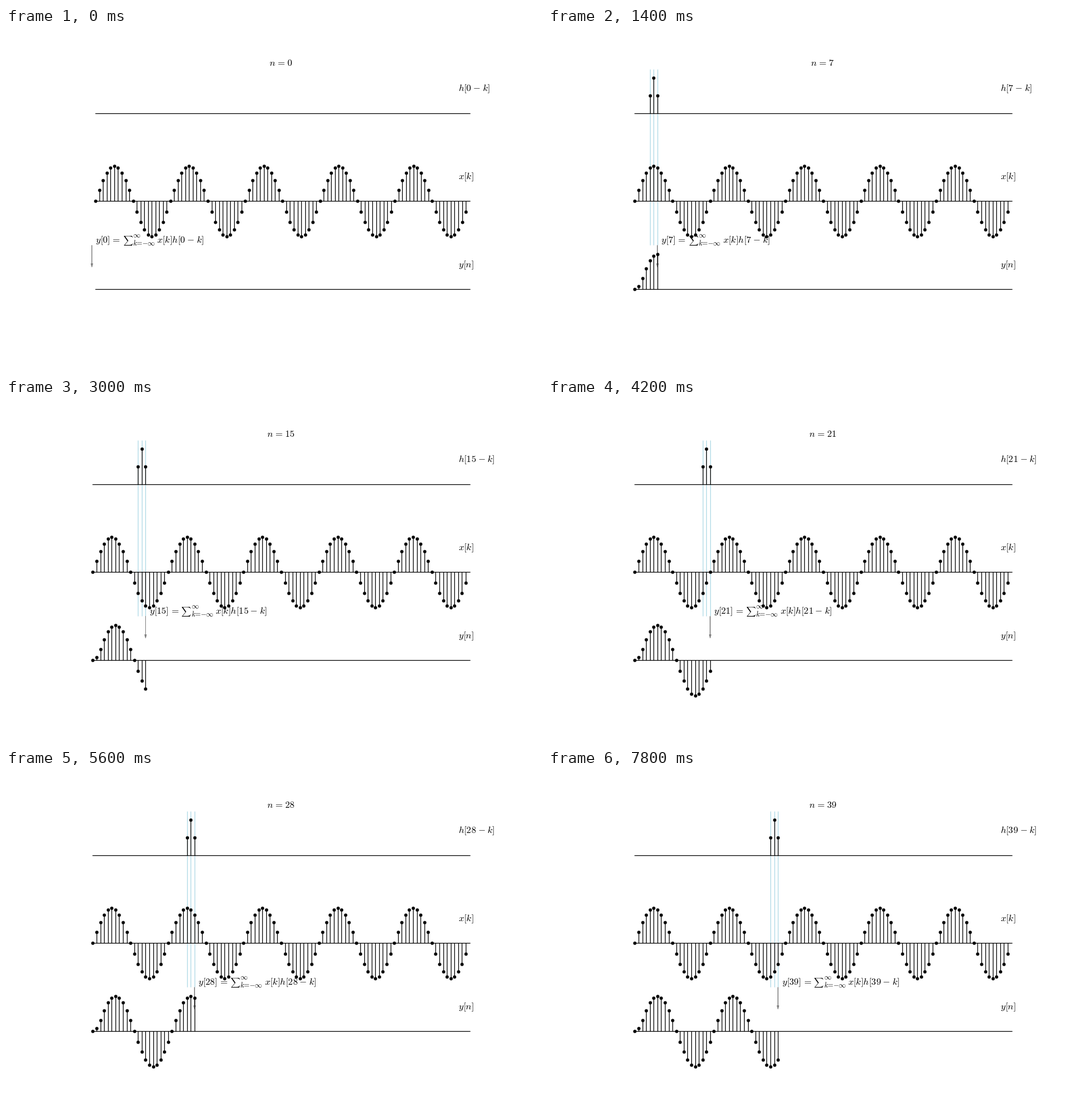
Animation of 935 by 599 pixels, one loop 8000 ms. Source, as a matplotlib script:

```python
import numpy as np
import matplotlib.pyplot as plt
from matplotlib.animation import FuncAnimation

plt.rcParams["mathtext.fontset"] = "cm"

W, H, DPI = 935, 599, 72        # at 72 dpi one point is one px
EM = 16.4                       # text size
LINE, EDGE, DOT = 1.25, 0.83, 5
LEFT, RIGHT = 0.125 * W, 0.9 * W
TOP, ROW = 0.12 * H, 0.77 * H / 3
BASES = [TOP + ROW * (i + 0.5) for i in range(3)]
UNIT = ROW / 2.5                # px per unit of amplitude
COUNT = 100
FRAMES, STEP = 40, 200

k = np.arange(COUNT)
x = np.sin(np.pi * k / 10)
h = np.array([0.5, 1, 0.5])
y = np.convolve(x, h)[:COUNT]
y /= np.abs(y).max()

# Operators with TeX-like spacing
EQ = r"\hspace{0.116}=\hspace{0.116}"
MINUS = r"\hspace{0.053}-\hspace{0.053}"
TIGHT_EQ = r"\hspace{-0.2}=\hspace{-0.2}"

fig = plt.figure(figsize=(W / DPI, H / DPI), dpi=DPI, facecolor="white")
ax = fig.add_axes([0, 0, 1, 1])


def scale(n):
    """Map sample index to px; the range reaches back to -1 only at n = 0."""
    low = -1 if n == 0 else -0.25
    margin = (RIGHT - LEFT) / 22
    per = (RIGHT - LEFT - 2 * margin) / (COUNT - low)
    return lambda i: LEFT + margin + (np.asarray(i) - low) * per


def stems(px, idx, vals, base):
    xs, tops = px(idx), base - UNIT * np.asarray(vals)
    ax.vlines(xs, base, tops, color="black", lw=LINE)
    ax.plot(xs, tops, "o", color="black", ms=DOT, mew=EDGE)
    ax.plot(px([0, COUNT]), [base, base], color="black", lw=LINE)


def math(px, py, tex, size=1, ha="left"):
    ax.text(px, py, f"${tex}$", fontsize=size * EM, ha=ha, va="baseline")


def formula(left, base, n):
    """Sum with its limits set to the side."""
    op = left + EM * (2.38 + 0.5 * len(str(n)))
    limits = op + 1.07 * EM
    math(left, base, f"y[{n}]{EQ}")
    math(op, base, r"\sum", 0.714)
    math(limits, base - 0.55 * EM, r"\infty", 0.76)
    math(limits, base + 0.3 * EM, rf"k{TIGHT_EQ}{{-}}\infty", 0.76)
    math(op + 3.65 * EM, base, f"x[k]h[{n}{MINUS}k]")


def draw(n):
    ax.clear()
    ax.set_xlim(0, W)
    ax.set_ylim(H, 0)
    ax.axis("off")
    px = scale(n)

    taps = np.arange(n - 3, n)
    shown = taps >= 0
    ax.vlines(px(taps[shown]), TOP, TOP + 2 * ROW,
              color="lightblue", lw=LINE, zorder=1)

    stems(px, taps[shown], h[shown], BASES[0])
    stems(px, k, x, BASES[1])
    stems(px, k[:n], y[:n], BASES[2])

    ax.arrow(float(px(n - 1)), TOP + 2 * ROW, 0, 32.2, width=0.01,
             head_width=3.3, head_length=6, fc="gray", ec="gray", lw=EDGE)

    math((LEFT + RIGHT) / 2, TOP - 6, f"n{EQ}{n}", ha="center")
    for base, tex in zip(BASES, (f"h[{n}{MINUS}k]", "x[k]", "y[n]")):
        math(float(px(97)), base - ROW / 4, tex)
    formula(float(px(n)), TOP + 2 * ROW - 4.1, n)
    return []


anim = FuncAnimation(fig, draw, frames=FRAMES, init_func=lambda: draw(0),
                     interval=STEP, repeat=True, repeat_delay=0)
plt.show()
```
